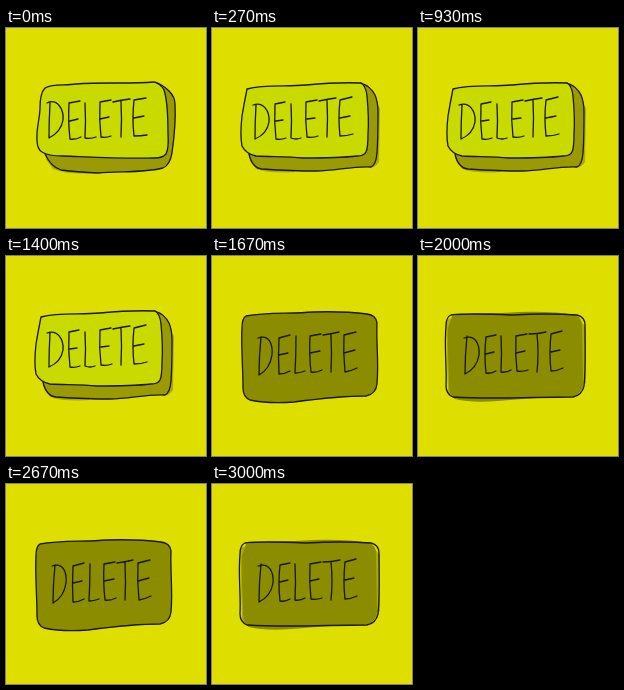
These frames come from a looping animation (200x200 px, 3070 ms). An HTML page:

```html
<!DOCTYPE html>
<html lang="en">
<head>
<meta charset="utf-8">
<title>Delete key</title>
<style>
html, body { margin: 0; width: 100%; height: 100%; overflow: hidden; background: #dedf00; }
svg { display: block; width: 100%; height: 100%; }
.line { fill: none; stroke: #161600; stroke-width: 1.3; stroke-linecap: round; stroke-linejoin: round; }
.top { fill: #c9da00; }
.side { fill: #9a9a06; }
.down { fill: #8b8c00; }
.smear { fill: #abac04; }
</style>
</head>
<body>
<svg id="stage" viewBox="0 0 200 200" role="img" aria-label="DELETE"></svg>
<script>
const LOOP = 3070, TICK = 200 / 3, HOLD = 4, PRESS = 23;

// Each pose is a stack of [class, path] layers, painted in order.
const upA = {
  face: "M39 60C48 55 59 58 70 56C97 54 124 56 148 54Q155 56 158 62C162 74 162 91 162 106Q163 120 160 126Q157 130 148 130C119 131 84 129 57 128Q42 128 36 124Q31 121 31 112C30 101 34 90 34 80Q34 65 39 60Z",
  side: "M149 54C155 56 159 59 163 63Q169 69 169 76C170 94 168 111 166 125Q164 137 157 140C138 145 113 143 92 145Q71 144 55 142Q45 139 39 126",
  smear: "M39 130L47 141Q62 147 86 145L84 142L55 140Z",
  letters: "M44 75Q43 93 43 110M41 75C51 70 58 81 57 92Q55 104 43 110M74 73L63 75Q62 94 64 111Q69 112 75 109M64 93L72 91M79 75Q80 93 79 110Q85 111 90 109M105 72L94 74Q93 92 95 109Q100 110 105 108M94 91L103 89M107 74Q115 72 124 71M115 73Q116 92 115 109M140 70L128 72Q126 91 128 108Q135 108 141 107M128 90L138 88"
};
const upC = {
  face: "M35 61C53 56 74 59 94 57Q126 54 149 55Q154 58 155 68C156 79 157 94 156 106Q156 120 154 124Q152 128 145 128C127 130 108 130 91 130C74 128 59 129 44 128Q34 126 30 118C28 108 29 97 30 88Q32 76 35 61Z",
  side: "M149 55C155 57 160 61 163 67Q166 74 166 84C166 98 166 112 165 125Q164 137 159 139C140 138 123 143 104 143C85 143 66 142 50 141Q40 140 37 126",
  smear: "M36 128L44 141Q58 146 83 144L83 141L49 139ZM165 76L168 80L167 134Q163 140 157 140L163 131Z",
  letters: "M44 77Q43 94 43 111M41 77C51 73 58 83 57 94Q55 106 43 111M73 74L63 76Q62 94 64 111Q69 112 74 110M64 93L71 92M79 76Q80 93 79 110Q84 112 89 110M105 72L94 74Q93 92 95 109Q101 110 106 108M95 91L103 90M107 73Q116 71 124 70M115 72Q116 90 115 109M140 69L128 72Q126 90 128 108Q135 108 141 106M128 90L138 88"
};
const downD = {
  face: "M34 60C55 56 78 58 101 56Q132 55 155 58Q164 59 165 67C164 85 167 106 165 128Q164 138 154 140C130 140 105 143 82 146Q57 148 38 144Q31 141 31 132C31 113 29 89 30 72Q30 62 34 60Z",
  letters: "M49 81Q47 101 47 119M46 82C57 78 61 88 60 99Q58 113 47 119M78 79L67 82Q66 100 67 118Q73 118 78 115M67 99L76 97M84 80Q84 99 83 117Q88 117 93 115M109 78L98 80Q97 99 99 116Q104 117 110 114M98 97L108 95M111 79Q119 78 127 76M119 79Q120 98 119 116M144 76L132 79Q131 97 133 116Q139 115 145 112M132 97L143 94"
};
const downE = {
  face: "M33 59C50 57 72 58 94 59Q130 57 159 59Q167 61 167 69C167 91 168 112 166 130Q164 139 155 141C130 141 102 142 77 142Q51 142 35 141Q28 138 28 130C29 110 26 90 28 70Q28 61 33 59Z",
  fill: "M34 60C53 56 78 58 101 56Q135 55 157 59Q164 61 164 70L165 128Q164 138 154 141C128 141 104 143 80 145Q53 147 37 143Q31 139 31 129C31 111 29 90 30 72Z",
  smear: "M28 64L34 62L37 143L30 138ZM161 62L168 72L168 127L160 138Z",
  letters: "M49 80Q47 99 47 118M46 82C57 78 62 88 61 99Q59 112 47 118M78 79L68 81Q66 99 68 117Q73 118 78 115M68 98L76 96M83 80Q84 98 83 116Q88 117 93 114M109 78L98 80Q97 98 99 115Q104 116 110 114M98 97L107 95M111 78Q120 78 128 76M119 78Q121 97 119 116M144 75L133 78Q131 97 133 115Q139 115 145 112M133 96L142 94"
};

const raised = p => [["smear", p.smear], ["side", p.side + "Z"], ["top", p.face],
  ["line", p.side], ["line", p.face], ["line", p.letters]];
const pressed = p => [["smear", p.smear || ""], ["down", p.fill || p.face],
  ["line", p.face], ["line", p.letters]];

const stage = document.getElementById("stage");
const NS = "http://www.w3.org/2000/svg";

function addPose(layers) {
  const g = document.createElementNS(NS, "g");
  for (const [name, d] of layers) {
    const path = document.createElementNS(NS, "path");
    path.setAttribute("class", name);
    path.setAttribute("d", d);
    g.append(path);
  }
  return stage.appendChild(g);
}

const poses = [raised(upA), raised(upC), pressed(downD), pressed(downE)].map(addPose);

// Two drawings alternate while the key is up, two others while it is down.
function draw(ms) {
  const tick = Math.floor(((ms % LOOP) + 4) / TICK);
  const down = tick >= PRESS;
  const step = Math.floor((down ? tick - PRESS : tick) / HOLD);
  const shown = (down ? 2 : 0) + step % 2;
  poses.forEach((g, i) => g.setAttribute("display", i === shown ? "inline" : "none"));
}

let start;
function loop(now) {
  start ??= now;
  draw(now - start);
  requestAnimationFrame(loop);
}
draw(0);
requestAnimationFrame(loop);
</script>
</body>
</html>
```
